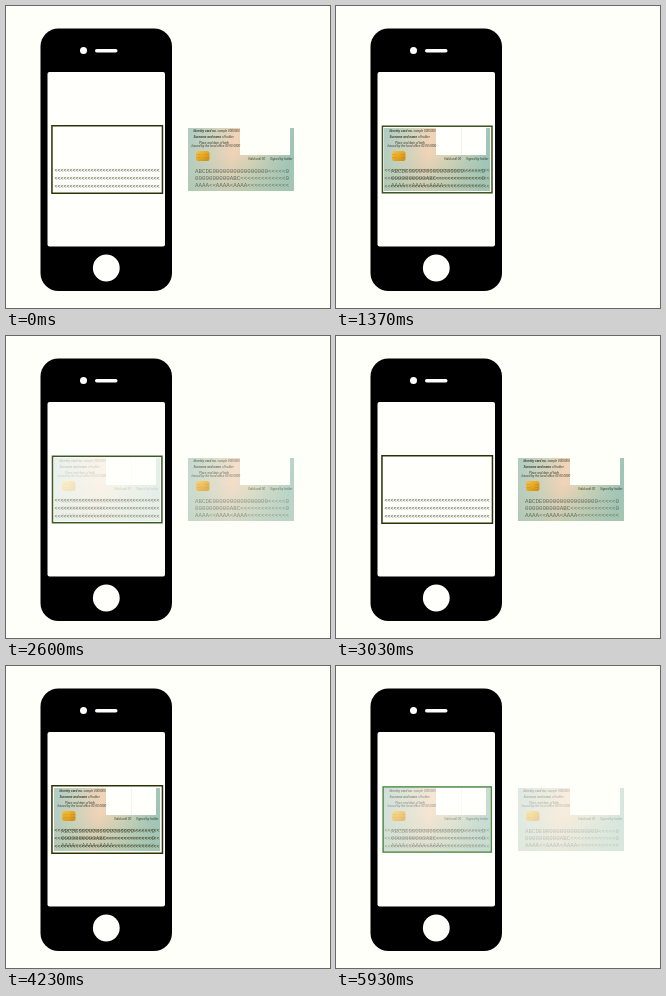
An HTML page that plays this animation: 324x302 px, repeating every 5.96 s.

```html
<!DOCTYPE html>
<html lang="en">
<head>
<meta charset="utf-8">
<title>Card scan</title>
<style>
  html, body { margin: 0; width: 100%; height: 100%; overflow: hidden; background: #fffffa; }
  svg { display: block; width: 324px; height: 302px; }
  text { white-space: pre; }
  .mono { font-family: "Liberation Mono", monospace; }
  .small { font: italic 3px "Liberation Sans", sans-serif; fill: #34382f; }
</style>
</head>
<body>
<svg viewBox="0 0 324 302">
  <defs>
    <linearGradient id="paper" x2="1" y2=".12">
      <stop offset="0" stop-color="#afcbc3"/>
      <stop offset=".24" stop-color="#ccd3bd"/>
      <stop offset=".47" stop-color="#f2d3b7"/>
      <stop offset=".66" stop-color="#d5d3b6"/>
      <stop offset="1" stop-color="#9fc5b8"/>
    </linearGradient>
    <linearGradient id="shade" x2="0" y2="1">
      <stop offset=".4" stop-color="#a9c5ae" stop-opacity="0"/>
      <stop offset="1" stop-color="#a9c5ae" stop-opacity=".6"/>
    </linearGradient>
    <linearGradient id="gold" x2="1" y2="1">
      <stop offset="0" stop-color="#f3c64a"/>
      <stop offset=".5" stop-color="#e5a722"/>
      <stop offset="1" stop-color="#c88c18"/>
    </linearGradient>
    <g id="card">
      <path id="sheet" d="M0 0H52V27H102V0H106V63H0Z" fill="url(#paper)"/>
      <path d="M0 0H52V27H102V0H106V63H0Z" fill="url(#shade)"/>
      <g class="small">
        <text x="5.5" y="4.3"><tspan font-weight="bold">Identity card no.</tspan> sample 0000000</text>
        <text x="5.5" y="10.2"><tspan font-weight="bold">Surname and name</tspan> of holder</text>
        <text x="11" y="15.6">Place and date of birth</text>
        <text x="3.5" y="19.2">Issued by the local office 00 00 0000</text>
        <text x="60" y="32">Valid until 00</text>
        <text x="82" y="32">Signed by holder</text>
      </g>
      <rect x="8" y="23" width="13.5" height="10" rx="2.5" fill="url(#gold)"/>
      <path d="M8.5 26.5H12.5M8.5 29.5H12.5M17 26.5H21M17 29.5H21" stroke="#b07c1a" stroke-width=".5" opacity=".6"/>
      <g id="zone" class="mono" font-size="5.8" fill="#62695f"></g>
    </g>
  </defs>

  <rect x="34.5" y="22.5" width="131.5" height="262.5" rx="18"/>
  <g fill="#fffffc">
    <rect x="41.5" y="66" width="117.5" height="174.5" rx="2"/>
    <circle cx="77.5" cy="44.5" r="3.5"/>
    <rect x="89" y="43" width="22.5" height="3.5" rx="1.75"/>
    <circle cx="100.3" cy="262" r="13.4"/>
  </g>

  <use id="loose" href="#card" x="182" y="122"/>
  <g id="held">
    <use href="#card" x="48" y="122"/>
    <path d="M125.5 122V149" stroke="#edf0e6" stroke-width=".8"/>
  </g>
  <g id="guides" class="mono" font-size="5" fill="#30330f"></g>
  <rect id="box" fill="none" stroke-width="1.5"/>
</svg>
<script>
const LOOP = 5960, CYCLE = 3400, FADE = 330;
const SWAP = 140, MATCH = 1265, RETURN = 2385;
const DARK = [44, 48, 6], GREEN = [104, 198, 118];
const $ = id => document.getElementById(id);

function addLines(parent, lines, x, y, step) {
  lines.forEach((line, i) => {
    const text = document.createElementNS("http://www.w3.org/2000/svg", "text");
    text.setAttribute("x", x);
    text.setAttribute("y", y + i * step);
    text.textContent = line;
    parent.append(text);
  });
}

addLines($("zone"), [
  "ABCDE" + "0".repeat(16) + "<<<<<0",
  "0".repeat(10) + "ABC" + "<".repeat(13) + "0",
  "AAAA<<AAAA<AAAA" + "<".repeat(12)
], 7, 45, 7.1);
addLines($("guides"), Array(3).fill("<".repeat(35)), 48.5, 165.8, 8);

const mix = (a, b, k) => a + (b - a) * k;

// Eased progress of a fade that begins at the given time
function ease(t, start) {
  const k = Math.min(1, Math.max(0, (t - start) / FADE));
  return (1 - Math.cos(Math.PI * k)) / 2;
}

function draw(time) {
  const t = time % LOOP % CYCLE;
  const back = ease(t, RETURN);
  const held = ease(t, SWAP) - back;
  const match = ease(t, MATCH) - back;
  $("loose").setAttribute("opacity", 1 - held);
  $("held").setAttribute("opacity", held);
  $("guides").setAttribute("opacity", 1 - match);

  const w = mix(110.5, 106.5, match), h = mix(67.5, 63.5, match);
  const box = $("box");
  box.setAttribute("x", 101.2 - w / 2);
  box.setAttribute("y", 153.5 - h / 2);
  box.setAttribute("width", w);
  box.setAttribute("height", h);
  box.setAttribute("stroke", `rgb(${DARK.map((c, i) => Math.round(mix(c, GREEN[i], match)))})`);
}

function tick() {
  draw(performance.now());
  requestAnimationFrame(tick);
}
tick();
</script>
</body>
</html>
```
